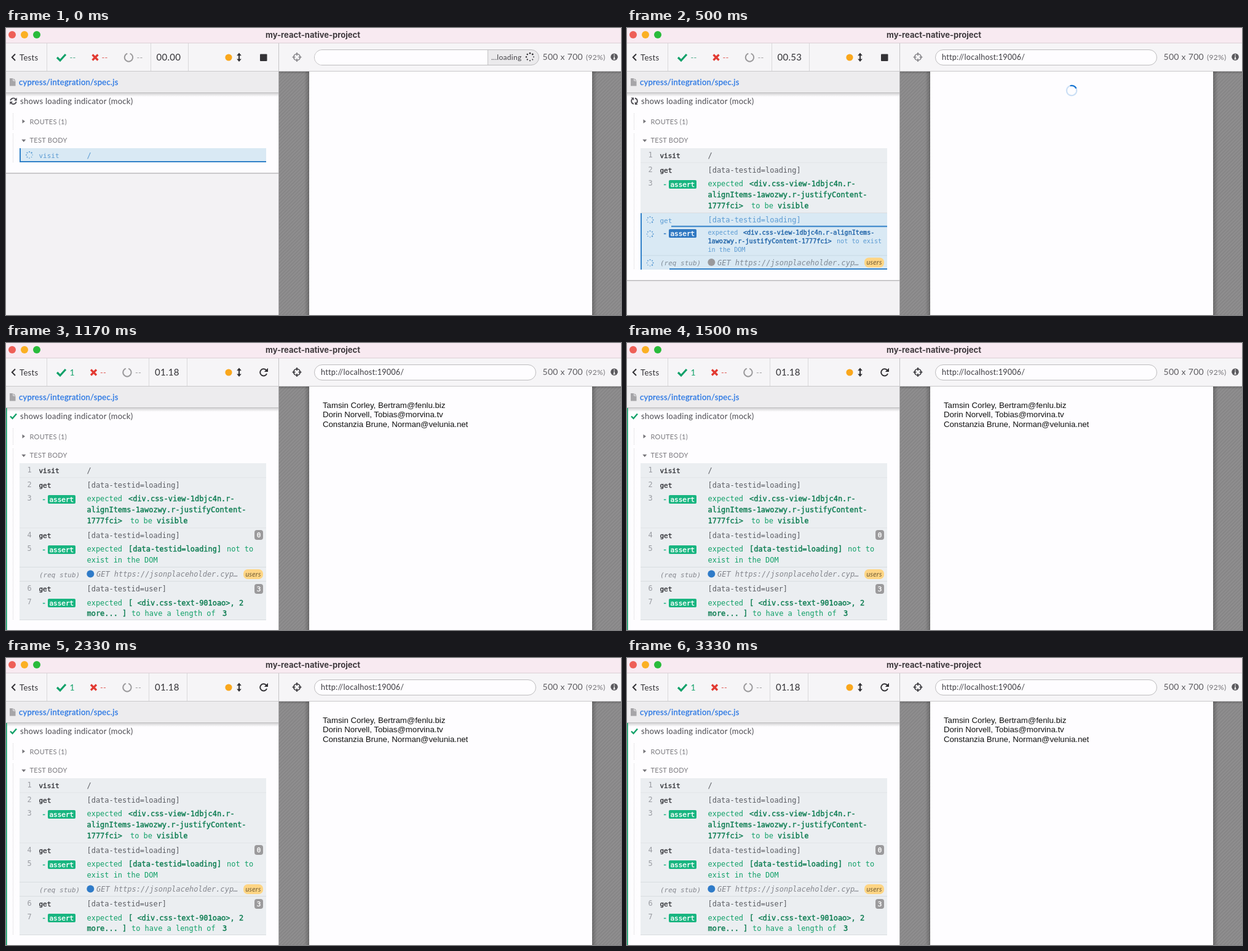
Animation, 1000 px wide and 468 px high, one loop 3.49 s. Source, as an HTML page:

```html
<!DOCTYPE html>
<html lang="en">
<head>
<meta charset="utf-8">
<title>Test runner</title>
<style>
html, body { margin: 0; width: 100%; height: 100%; overflow: hidden; background: #f3f2f4; }
svg { display: block; width: 1000px; height: 468px; }
text { font-family: Lato, "Open Sans", sans-serif; letter-spacing: .29px; white-space: pre; }
.code { font-family: "DejaVu Sans Mono", "Liberation Mono", monospace; font-size: 11.96px; letter-spacing: 0; }
.cmd { font-size: 11px; }
.small { font-size: 10.15px; }
.b { stroke-width: .4px; }
.i { font-style: italic; }
.title { font: 700 13px Inter, sans-serif; letter-spacing: 0; }
.page { font: 13.2px "Liberation Sans", Arial, sans-serif; letter-spacing: 0; }
.f11 { font-size: 11px; } .f12 { font-size: 12px; } .f125 { font-size: 12.5px; }
.f13 { font-size: 13px; } .f14 { font-size: 14px; } .f15 { font-size: 15px; }
</style>
</head>
<body>
<svg id="stage" viewBox="0 0 1000 468">
  <defs>
    <pattern id="stripes" width="4" height="4" patternUnits="userSpaceOnUse" patternTransform="rotate(45)">
      <rect width="4" height="4" fill="#8f8e8f"/><rect width="1.5" height="4" fill="#848384"/>
    </pattern>
    <linearGradient id="fade" x2="0" y2="1">
      <stop stop-color="#000" stop-opacity=".2"/><stop offset="1" stop-color="#000" stop-opacity="0"/>
    </linearGradient>
    <linearGradient id="edgeL"><stop stop-opacity="0"/><stop offset="1" stop-opacity=".22"/></linearGradient>
    <linearGradient id="edgeR"><stop stop-opacity=".22"/><stop offset="1" stop-opacity="0"/></linearGradient>
  </defs>
</svg>
<script>
const LOOP = 3490;
const STEPS = [0, 170, 330, 500, 670, 830, 1000, 1170];
const GREEN = '#12a169', DEEP = '#0d7d52', BLUE = '#5b9bd3', NAVY = '#1d62a8', LINE = '#3080c8';
const stage = document.getElementById('stage');
const spinners = [], bars = [], layers = [];

function el(parent, tag, attrs, text) {
  const node = document.createElementNS('http://www.w3.org/2000/svg', tag);
  for (const key in attrs) node.setAttribute(key, attrs[key]);
  if (text !== undefined) node.textContent = text;
  parent.appendChild(node);
  return node;
}
const rect = (g, x, y, width, height, fill, rx = 0) => el(g, 'rect', { x, y, width, height, fill, rx });
const dot = (g, cx, cy, r, fill) => el(g, 'circle', { cx, cy, r, fill });
const path = (g, d, fill) => el(g, 'path', { d, fill });
const stroke = (g, d, color, width = 1, more = {}) =>
  el(g, 'path', { d, fill: 'none', stroke: color, 'stroke-width': width, ...more });
const text = (g, x, y, str, cls, fill) => el(g, 'text', { x, y, class: cls, fill }, str);

// Class b thickens the glyphs slightly with an outline in their own colour.
function code(g, x, y, str, fill, cls = '') {
  const node = text(g, x, y, str, 'code ' + cls, fill);
  if (node.classList.contains('b')) node.setAttribute('stroke', fill);
}

// A layer is visible in the listed phases: 0 loading, 1 waiting, 2 finished.
function layer(phases) {
  const g = el(stage, 'g', {});
  layers.push({ g, phases });
  return g;
}
function spinner(parent, x, y, period, offset = 0) {
  const outer = el(parent, 'g', { transform: `translate(${x} ${y})` });
  const g = el(outer, 'g', {});
  spinners.push({ g, period, offset });
  return g;
}
function dots(parent, x, y, color, size = 5) {
  const g = spinner(parent, x, y, 2000);
  for (let i = 0; i < 8; i++) {
    const a = i * Math.PI / 4;
    dot(g, size * Math.cos(a), size * Math.sin(a), size * (.15 + i * .012), color);
  }
}
function bar(parent, y, start) {
  bars.push({ node: stroke(parent, '', LINE, 2), y, start });
}
function tag(g, y, fill) {
  code(g, 58, y, '-', fill, 'b');
  rect(g, 68, y - 10.5, 45, 14, fill, 2);
  code(g, 70.5, y, 'assert', '#fff', 'cmd b');
}
function row(g, y, h, num, line = true) {
  rect(g, 22, y, 401, h, '#ebeef1');
  if (line) rect(g, 22, y + h - 1, 401, 1, '#d9dde0');
  if (num) code(g, 34.5, y + 15, num, '#9a9ca2');
}
function get(g, y, num, what) {
  row(g, y, 23, num, false);
  code(g, 53.5, y + 16, 'get', '#34353a', 'cmd b');
  code(g, 131.5, y + 16, what, '#5c5e64');
}
function count(g, y, n) {
  rect(g, 404, y, 14, 16, '#9b9a9c', 4);
  code(g, 407.7, y + 12, n, '#fff', 'cmd b');
}
function stub(g, y, color, ink) {
  code(g, 54, y + 5, '(req stub)', ink, 'cmd i');
  dot(g, 137.3, y, 6, color);
  code(g, 147, y + 4.5, 'GET https://jsonplaceholder.cyp…', ink, 'i');
  rect(g, 386, y - 7.5, 32, 16, '#fed584', 7);
  text(g, 389.5, y + 4, 'users', 'f11 i', '#6f5a34');
}
function stats(g, dx, passed) {
  stroke(g, 'M83 48 L88 53 L97 43', GREEN, 3.2);
  text(g, 103.5, 52.5, passed, passed === '1' ? 'f14' : 'f13', passed === '1' ? GREEN : '#4cab88');
  stroke(g, `M${140.5 + dx} 43.5 l9 9 m0 -9 l-9 9`, '#e23a32', 3.2);
  text(g, 155.5 + dx, 52.5, '--', 'f13', '#e0605a');
  const x = 199.5 + dx;
  stroke(g, `M${x - 2.2} 41.6 A6.7 6.7 0 1 0 ${x + 2.2} 41.6`, '#9b9a9c', 2);
  text(g, 212.5 + dx, 52.5, '--', 'f13', '#a3a2a4');
  for (const d of [235, 296]) rect(g, d + (dx && (d > 240 ? -2 : -3)), 25, 1, 45, '#dad9db');
}
function target(g, color) {
  el(g, 'circle', { cx: 473, cy: 47.5, r: 5.3, fill: 'none', stroke: color, 'stroke-width': 1.6 });
  stroke(g, 'M473 40 v5 M473 50 v5 M465.5 47.5 h5 M475.5 47.5 h5', color, 1.7);
}
function pill(g, width, fill) {
  el(g, 'rect', { x: 501.5, y: 35.5, width, height: 25, rx: 12.5, fill, stroke: '#bdbcbe' });
}

// Window, toolbar and preview
const base = layer('012');
rect(base, 0, 0, 1000, 468, '#f3f2f4');
rect(base, 0, 0, 1000, 25, '#f8eaf1');
rect(base, 0, 24, 1000, 1, '#dcd0d6');
['#ee5f57', '#fbb024', '#29bb3b'].forEach((c, i) => dot(base, 10 + i * 20, 11, 6, c));
el(base, 'text', { x: 499, y: 15.5, class: 'title', fill: '#3e393d', 'text-anchor': 'middle' }, 'my-react-native-project');
rect(base, 0, 25, 1000, 46, '#f6f5f7');
rect(base, 0, 70, 1000, 1, '#c9c8ca');
stroke(base, 'M15 42.5 L9.8 47.7 L15 53', '#333236', 2);
text(base, 22, 52.5, 'Tests', 'f13', '#333236');
rect(base, 66, 25, 1, 45, '#dad9db');
dot(base, 362, 48, 5.6, '#faa71c');
stroke(base, 'M379 43 V53', '#333236', 2);
path(base, 'M379 40.5 l3.8 4.5 h-7.6z M379 55 l3.8 -4.5 h-7.6z', '#333236');
text(base, 872.5, 52, '500 x 700', 'f14', '#5d5c60');
text(base, 943, 52, '(92%)', 'f12', '#737276');
dot(base, 989, 47.2, 5.8, '#5b5a5e');
stroke(base, 'M989 43.3 v1.7 M989 46.3 v4.3 M987.5 50.6 h3', '#fff', 1.5);
rect(base, 444, 71, 556, 397, 'url(#stripes)');
rect(base, 485, 71, 8, 397, 'url(#edgeL)');
rect(base, 953, 71, 8, 397, 'url(#edgeR)');
rect(base, 444, 71, 556, 4, 'url(#fade)');
rect(base, 493, 71, 460, 397, '#fefdff');
rect(base, 443, 25, 1, 46, '#c4c3c5');
rect(base, 443, 71, 1, 397, '#aaa9ab');

// Test panel
const panel = rect(base, 0, 106, 443, 130, '#fefdff');
const edge = rect(base, 0, 236, 443, 1.5, '#bcbbbd');
rect(base, 0, 71, 443, 35, '#edecee');
rect(base, 0, 105, 443, 7, 'url(#fade)');
path(base, 'M6 82 h6 l3.5 3.5 V94.5 H6z', '#a6a5a8');
stroke(base, 'M11.7 82 v4 h4', '#edecee', 1);
el(base, 'text', { x: 21, y: 92.5, class: 'f13', fill: '#2b78e4', stroke: '#2b78e4', 'stroke-width': .3 }, 'cypress/integration/spec.js');
text(base, 23, 123.5, 'shows loading indicator (mock)', 'f13', '#4b4a50');
stroke(base, 'M11.5 139 V167', '#d5d4d6', 1, { 'stroke-dasharray': '1 1' });
const guide = stroke(base, '', '#d5d4d6', 1, { 'stroke-dasharray': '1 1' });
path(base, 'M26.5 149 l4.5 3.3 l-4.5 3.3z M25.3 181.8 h7 l-3.5 4.2z', '#77767b');
text(base, 38.5, 156.5, 'ROUTES (1)', 'f11', '#7b7a7f');
text(base, 38.5, 187.3, 'TEST BODY', 'f11', '#7b7a7f');

// Still running
const run = layer('01');
stats(run, 0, '--');
rect(run, 413, 42.5, 11.5, 11.5, '#333236', 1);
target(run, '#858488');
const sync = spinner(run, 12, 119.2, 2000);
for (const turn of [0, 180]) {
  const half = el(sync, 'g', { transform: `rotate(${turn})` });
  stroke(half, 'M-4.7 -1 A4.8 4.8 0 0 1 3.6 -3.2', '#4b4a50', 1.8);
  path(half, 'M5.7 -5.6 V-.8 H.9z', '#4b4a50');
}

// First visit
const load = layer('0');
pill(load, 365, '#ebeaec');
path(load, 'M783 36 H514 a12 12 0 0 0 0 24 H783z', '#fefdff');
rect(load, 783, 36, 1, 24, '#c4c3c5');
text(load, 789, 51.8, '...loading', 'f12', '#434247');
dots(load, 852, 47.2, '#333236', 6);
rect(load, 22, 196, 401, 23, '#d9e9f4');
rect(load, 22, 196, 2, 23, LINE);
dots(load, 38, 207, BLUE);
code(load, 53.5, 212, 'visit', BLUE, 'cmd');
code(load, 131.5, 211.5, '/', BLUE);
bar(load, 218, 0);

// Rows present once the page has opened
const open = layer('12');
pill(open, 360, '#fefdff');
text(open, 512, 52, 'http://localhost:19006/', 'f125', '#3b3a3f');
row(open, 196, 24, '1');
code(open, 53.5, 212, 'visit', '#34353a', 'cmd b');
code(open, 131.5, 211.5, '/', '#5c5e64');
get(open, 219.5, '2', '[data-testid=loading]');
row(open, 242, 60, '3');
tag(open, 258.5, '#18b580');
code(open, 131.5, 258, 'expected', GREEN);
code(open, 199, 258, '<div.css-view-1dbjc4n.r-', DEEP, 'b');
code(open, 131.5, 276, 'alignItems-1awozwy.r-justifyContent-', DEEP, 'b');
code(open, 131.5, 293.5, '1777fci>', DEEP, 'b');
code(open, 202, 293.5, 'to be', GREEN);
code(open, 245, 293.5, 'visible', DEEP, 'b');

// Waiting for the reply
const wait = layer('1');
rect(wait, 22, 302, 401, 92, '#d9e9f4');
rect(wait, 22, 370.5, 401, 1, '#c8d9e6');
rect(wait, 22, 302, 2, 92, LINE);
for (const y of [313, 336, 383]) dots(wait, 37.5, y, BLUE);
code(wait, 53.5, 317.5, 'get', BLUE, 'cmd');
code(wait, 131.5, 317, '[data-testid=loading]', BLUE);
tag(wait, 338.5, '#2f78c2');
code(wait, 131.5, 337, 'expected', BLUE, 'small');
code(wait, 189, 337, '<div.css-view-1dbjc4n.r-alignItems-', NAVY, 'small b');
code(wait, 131.5, 350.7, '1awozwy.r-justifyContent-1777fci>', NAVY, 'small b');
code(wait, 341, 350.7, 'not to exist', BLUE, 'small');
code(wait, 131.5, 364.5, 'in the DOM', BLUE, 'small');
stub(wait, 382, '#99999c', '#7f8a96');
bar(wait, 323.5, 0);
bar(wait, 393, 30);
const activity = spinner(wait, 723, 102, 750, 94 - 360 * 170 / 750);
el(activity, 'circle', { r: 8.2, fill: 'none', stroke: '#1976d2', 'stroke-width': 2.2, 'stroke-opacity': .22 });
el(activity, 'circle', { r: 8.2, fill: 'none', stroke: '#1976d2', 'stroke-width': 2.2, 'stroke-dasharray': '11.7 60' });

// Finished
const done = layer('2');
stats(done, -2.5, '1');
stroke(done, 'M423.3 44.6 A5.6 5.6 0 1 0 424 50', '#333236', 2);
path(done, 'M426 40.8 V47 H419.8z', '#333236');
target(done, '#333236');
rect(done, 0, 106, 1.6, 362, GREEN);
stroke(done, 'M7 119.5 L10.5 123 L17 115.5', GREEN, 2.4);
get(done, 301.5, '4', '[data-testid=loading]');
count(done, 305, '0');
row(done, 324, 42, '5');
tag(done, 340.5, '#18b580');
code(done, 131.5, 340, 'expected', GREEN);
code(done, 199, 340, '[data-testid=loading]', DEEP, 'b');
code(done, 359, 340, 'not to', GREEN);
code(done, 131.5, 357.5, 'exist in the DOM', GREEN);
row(done, 366, 23);
stub(done, 376.5, '#2f7bc8', '#84868d');
get(done, 389, '6', '[data-testid=user]');
count(done, 393, '3');
row(done, 411, 41, '7');
tag(done, 427.5, '#18b580');
code(done, 131.5, 427.5, 'expected', GREEN);
code(done, 199, 427.5, '[ <div.css-text-901oao>, 2', DEEP, 'b');
code(done, 131.5, 445, 'more... ]', DEEP, 'b');
code(done, 204, 445, 'to have a length of', GREEN);
code(done, 352, 445, '3', DEEP, 'b');
['Tamsin Corley, Bertram@fenlu.biz', 'Dorin Norvell, Tobias@morvina.tv', 'Constanzia Brune, Norman@velunia.net']
  .forEach((s, i) => text(done, 515, 105.5 + i * 15.6, s, 'page', '#111'));

const clock = text(layer('012'), 245, 53, '', 'f15', '#333236');

function draw(time) {
  const now = time % LOOP;
  const step = STEPS.filter(s => s <= now).length - 1;
  const t = STEPS[step];
  const phase = step === 0 ? 0 : step < 7 ? 1 : 2;
  for (const { g, phases } of layers) g.style.display = phases.includes(phase) ? '' : 'none';

  const height = [130, 305, 362][phase];
  panel.setAttribute('height', height);
  edge.setAttribute('y', 106 + height);
  guide.setAttribute('d', `M11.5 172 V${[219, 394, 452][phase]}`);

  const secs = phase === 0 ? 0 : phase === 2 ? 1.18 : .21 + .158 * (step - 1);
  clock.textContent = secs.toFixed(2).padStart(5, '0');
  clock.setAttribute('x', phase === 2 ? 242 : 244.5);

  for (const s of spinners) s.g.setAttribute('transform', `rotate(${s.offset + 360 * t / s.period})`);
  for (const b of bars) b.node.setAttribute('d', `M${22 + Math.max(0, t - b.start) * .1} ${b.y} H423`);
}

const start = performance.now();
function tick() {
  draw(performance.now() - start);
  requestAnimationFrame(tick);
}
tick();
</script>
</body>
</html>
```
